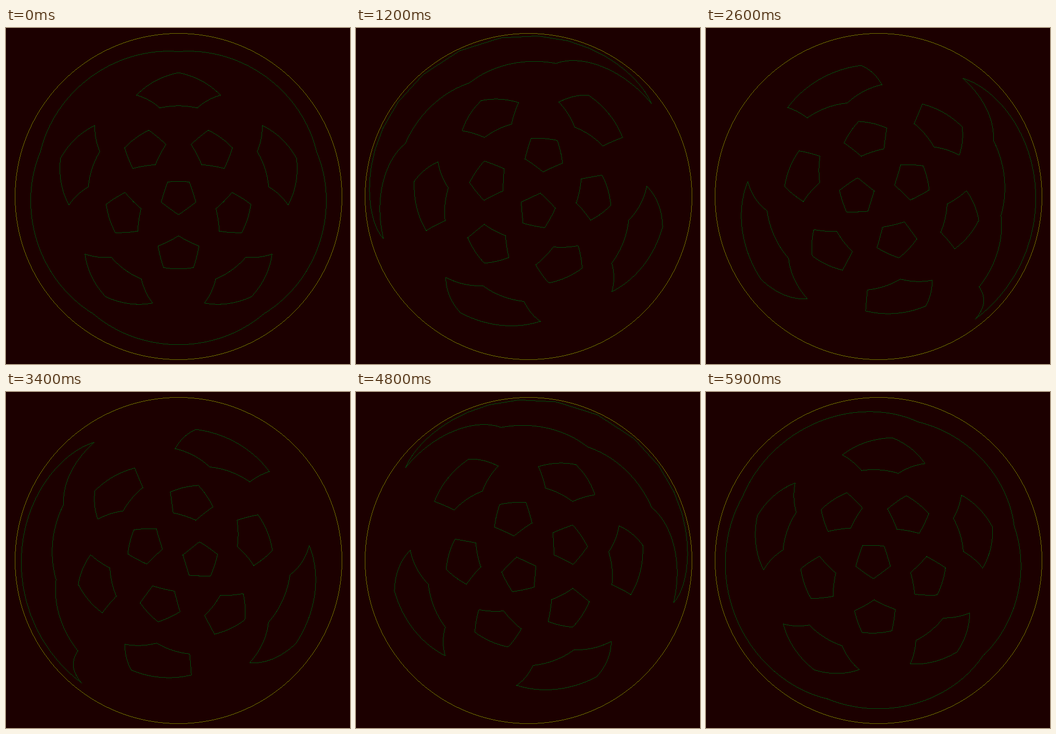
Animation, 661 px wide and 647 px high, one loop 6 s. Source, as an HTML page with a canvas:

```html
<!DOCTYPE html>
<html lang="en">
<head>
<meta charset="utf-8">
<title>Turning ball</title>
<style>
  html, body { margin: 0; height: 100%; overflow: hidden; background: #1c0000; }
  canvas { display: block; }
</style>
</head>
<body>
<canvas width="661" height="647"></canvas>
<script>
const ctx = document.querySelector('canvas').getContext('2d');
const CX = 331, CY = 324, R = 314, TAU = 2 * Math.PI;
const LOOP = 6000, STEP = 100, SAMPLES = 40;

const dot = (a, b) => a[0] * b[0] + a[1] * b[1] + a[2] * b[2];
const mix = (a, b, u) => a.map((v, i) => v + (b[i] - v) * u);
const adjacent = (a, b) => Math.abs(dot(a, b) - 1 / Math.sqrt(5)) < 0.01;
const plot = (x, y) => ctx.fillRect(Math.round(x), Math.round(y), 1, 1);

// Icosahedron corners are the centres of the ball's pentagons.
const centres = [[0, 0, 1]];
for (let k = 0; k < 5; k++) {
  const a = k * TAU / 5, s = 2 / Math.sqrt(5);
  centres.push([s * Math.sin(a), s * Math.cos(a), 1 / Math.sqrt(5)]);
}
centres.push(...centres.map(c => c.map(v => -v)));

const edges = [];
for (const c of centres) {
  const around = centres.filter(n => adjacent(c, n));
  around.forEach((a, i) => around.slice(i + 1).forEach(b => {
    if (adjacent(a, b)) edges.push([mix(c, a, 1 / 3), mix(c, b, 1 / 3)]);
  }));
}

// Azimuthal equidistant view of the whole sphere after a turn about the vertical axis.
function project([x, y, z], turn) {
  const c = Math.cos(turn), s = Math.sin(turn);
  const px = x * c + z * s, pz = z * c - x * s;
  const flat = Math.hypot(px, y) || 1e-9;
  const r = R * Math.atan2(flat, pz) / Math.PI;
  return [CX + r * px / flat, CY + r * y / flat];
}

// One-pixel line without antialiasing, one pixel per step of the longer axis.
function line(a, b) {
  const m = Math.abs(b[0] - a[0]) > Math.abs(b[1] - a[1]) ? 0 : 1;
  if (a[m] > b[m]) [a, b] = [b, a];
  const slope = (b[1 - m] - a[1 - m]) / (b[m] - a[m] || 1);
  for (let p = Math.round(a[m]); p <= Math.round(b[m]); p++) {
    const q = a[1 - m] + slope * (p - a[m]);
    m ? plot(q, p) : plot(p, q);
  }
}

function circle() {
  for (let d = 0; d <= R * Math.SQRT1_2; d++) {
    const e = Math.round(Math.sqrt(R * R - d * d));
    for (const i of [-1, 1]) for (const j of [-1, 1]) {
      plot(CX + i * d, CY + j * e);
      plot(CX + i * e, CY + j * d);
    }
  }
}

function draw(turn) {
  ctx.fillStyle = '#1c0000';
  ctx.fillRect(0, 0, 661, 647);
  ctx.fillStyle = '#005010';
  for (const [a, b] of edges) {
    const at = i => project(mix(a, b, i / SAMPLES), turn);
    for (let i = 0; i < SAMPLES; i++) line(at(i), at(i + 1));
  }
  ctx.fillStyle = '#747400';
  circle();
}

const start = performance.now();
let shown = -1;
function tick() {
  const step = Math.floor((performance.now() - start) % LOOP / STEP);
  if (step !== shown) draw(step * STEP / LOOP * TAU);
  shown = step;
  requestAnimationFrame(tick);
}
tick();
</script>
</body>
</html>
```
